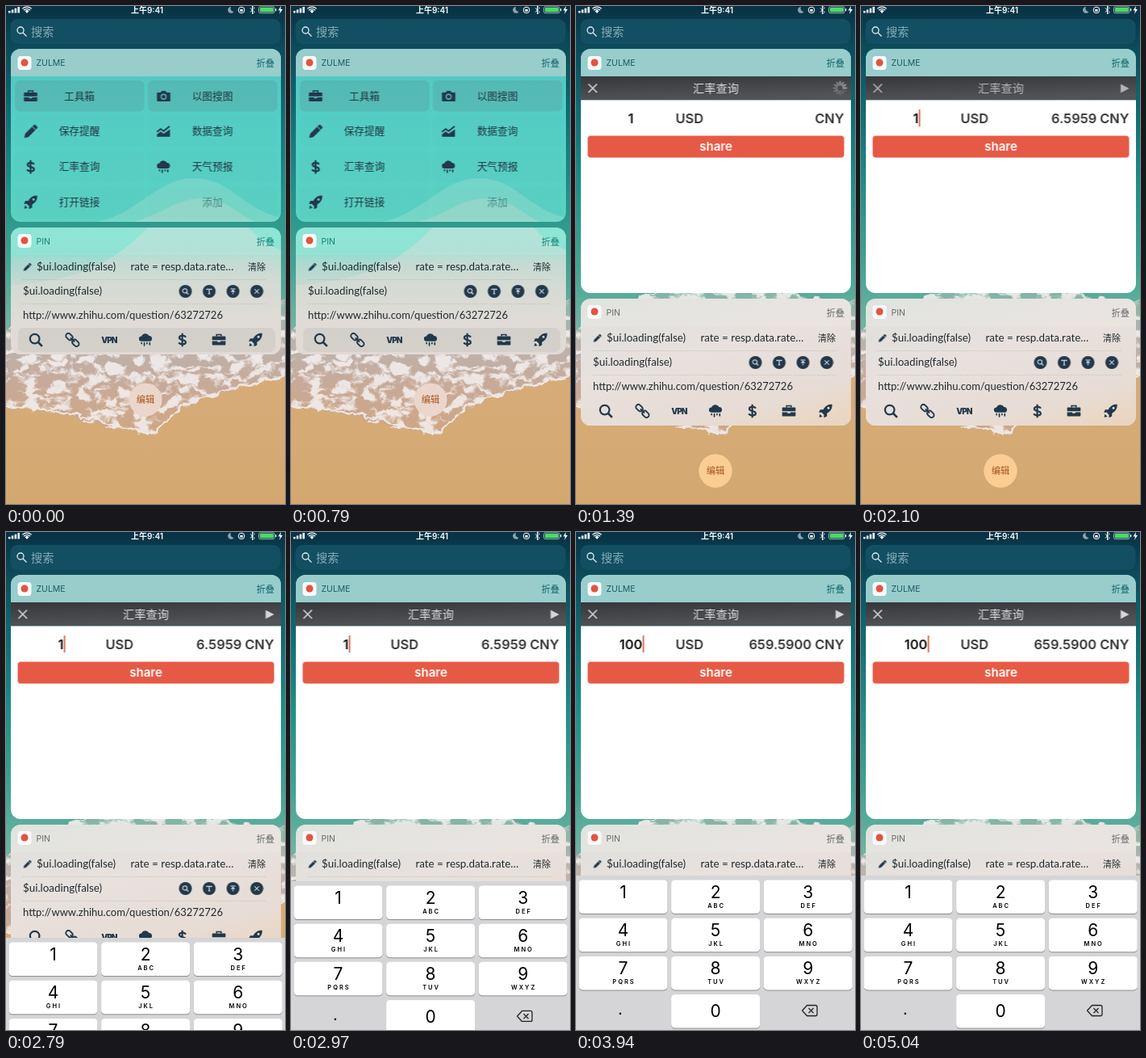
Write an HTML page that moves like this. It is 346 by 616 pixels and loops after 5.14 s.

```html
<!DOCTYPE html>
<html lang="zh-CN">
<head>
<meta charset="utf-8">
<title>Widgets</title>
<style>
html, body { margin: 0; width: 100%; height: 100%; overflow: hidden; background: #0a3d50; }
#stage { position: relative; width: 346px; height: 616px; overflow: hidden; }
#stage > *, .card > svg, .layer { position: absolute; }
svg { display: block; font-family: Inter, "Noto Sans CJK SC", "Noto Sans CJK", sans-serif; }
.cjk { font-family: "Noto Sans CJK SC", "Noto Sans CJK", "Noto Sans", sans-serif; }
.lato { font-family: Lato, "Noto Sans CJK SC", sans-serif; fill: #1f2a30; }
.mid { text-anchor: middle; }
.end { text-anchor: end; }
.ink { fill: #22384b; stroke: #22384b; stroke-width: 0; }
.card { left: 5.5px; width: 335px; border-radius: 12px; overflow: hidden; }
.layer { inset: 0; }
#board { top: 53px; height: 214px; background: linear-gradient(#52c6c0, #54d0c6 45%, #5ad2c2);
  animation: grow 5.14s infinite; }
#pin { top: 274px; height: 157px; background:
  linear-gradient(#82e2d2, #84e0d0 20%, #a6dacf 25%, #c6d8d1 45%, #d8dad5 70%, #ddd6d2); }
#pale { background: linear-gradient(165deg, #dde0dc, #e8e1de 42%, #e7dcd5 76%, #ead5bd); }
#pin, #edit { animation: slide 5.14s infinite; }
#pale, .warm { animation: appear 5.14s infinite; }
.pinTag { animation: grayTag 5.14s infinite; }
#view { animation: rise 5.14s infinite; }
#cells, #pill { animation: leave 5.14s infinite; }
#keys { left: 0; top: 425px; animation: keysUp 5.14s infinite; }
.bar { animation: dim 5.14s infinite; }
.step { animation: 5.14s step-end infinite; }
#wheel { transform-origin: 327px 101.5px; animation: spin 1.028s steps(12) infinite; }

@keyframes grow {
  0%, 15.56% { height: 214px; animation-timing-function: ease; }
  22.37%, 100% { height: 302px; }
}
@keyframes slide {
  0%, 15.56% { transform: none; animation-timing-function: ease; }
  22.37%, 100% { transform: translateY(88px); }
}
@keyframes rise {
  0%, 15.56% { transform: translateY(30px); opacity: 0; animation-timing-function: ease; }
  18.5% { opacity: 1; }
  22.37%, 100% { transform: none; opacity: 1; }
}
@keyframes leave { 0%, 15.56% { opacity: 1; } 18.5%, 100% { opacity: 0; } }
@keyframes appear { 0%, 15.56% { opacity: 0; } 20.4%, 100% { opacity: 1; } }
@keyframes grayTag { 0%, 15.56% { fill: #168577; } 20.4%, 100% { fill: #666d6d; } }
@keyframes dim { 0%, 37.3% { opacity: 1; } 39.1%, 49.42% { opacity: .76; } 50.97%, 100% { opacity: 1; } }
@keyframes keysUp {
  0%, 52.82% { transform: translateY(191px); animation-timing-function: cubic-bezier(.2,.7,.2,1); }
  60.99%, 100% { transform: none; }
}
@keyframes spin { to { transform: rotate(360deg); } }
@keyframes wait { 0% { opacity: 1; } 34.05%, 100% { opacity: 0; } }
@keyframes ready { 0% { opacity: 0; } 34.05%, 100% { opacity: 1; } }
@keyframes rate1 { 0% { opacity: 0; } 34.05% { opacity: 1; } 66.15%, 100% { opacity: 0; } }
@keyframes one { 0% { opacity: 1; } 66.15%, 100% { opacity: 0; } }
@keyframes ten { 0% { opacity: 0; } 66.15% { opacity: 1; } 69.65%, 100% { opacity: 0; } }
@keyframes hundred { 0% { opacity: 0; } 69.65%, 100% { opacity: 1; } }
@keyframes caret {
  0% { opacity: 0; transform: none; }
  39.1% { opacity: 1; }
  49.42% { opacity: 0; }
  50.97% { opacity: 1; transform: none; }
  66.15% { opacity: 1; transform: translateX(5.5px); }
  69.65% { opacity: 1; transform: translateX(11px); }
  93.77% { opacity: 0; transform: translateX(11px); }
  98.05%, 100% { opacity: 1; transform: translateX(11px); }
}
</style>
</head>
<body>
<svg width="0" height="0" style="position:absolute">
  <defs>
    <symbol id="tools" viewBox="0 0 20 20"><path d="M7 5V3h6v2" fill="none" stroke-width="1.8"/><path d="M2 5h16q1 0 1 1v4.4H1V6q0-1 1-1zM1 11.6h7v1.5h4v-1.5h7V16q0 1-1 1H2q-1 0-1-1z"/></symbol>
    <symbol id="pencil" viewBox="0 0 20 20"><path d="M2 18l1-5 9-9 4 4-9 9zM13 3l1.5-1.5q1-.8 2 0l2 2q.8 1 0 2L17 7z" stroke-width=".8"/></symbol>
    <symbol id="dollar" viewBox="0 0 20 20"><path d="M14.6 6.5C13 3.5 6 3.5 6 7c0 4 8.6 2 8.6 6.2 0 3.3-7.6 3.5-9.2.3M10 1v18" fill="none" stroke-width="2.4"/></symbol>
    <symbol id="camera" viewBox="0 0 20 20"><path fill-rule="evenodd" d="M2 5h4l1.5-2h5L14 5h4q1 0 1 1v10q0 1-1 1H2q-1 0-1-1V6q0-1 1-1zM10 6.8a4 4 0 1 0 0 8 4 4 0 0 0 0-8z"/><circle cx="10" cy="10.8" r="2.5"/></symbol>
    <symbol id="chart" viewBox="0 0 20 20"><path d="M1 10.5l5-4 4 3 8-6.5" fill="none" stroke-width="2"/><path d="M1 17v-3l5-4 4 3 8.5-6v10z"/></symbol>
    <symbol id="rain" viewBox="0 0 20 20"><path d="M4.5 12a3.5 3.5 0 0 1 0-7 5.500 5.500 0 0 1 10-.5 3.800 3.800 0 0 1 1 7.500z"/><path d="M4.500 14v1M8.200 14v3.500M11.800 14v1M15.500 14v2.500" stroke-width="1.800" stroke-linecap="round"/></symbol>
    <symbol id="rocket" viewBox="0 0 20 20"><path fill-rule="evenodd" d="M19 1c-6 0-9 2-12 7H3l-2 4h4l3 3v4l4-2v-4c5-3 7-6 7-12zM14 4.300a1.700 1.700 0 1 0 0 3.400 1.700 1.700 0 0 0 0-3.400z"/><path d="M1.500 18.500l1-4.500L6 17.500z"/></symbol>
    <symbol id="search" viewBox="0 0 20 20"><circle cx="8.500" cy="8.500" r="6.300" fill="none" stroke-width="2.400"/><path d="M13 13l5.500 5.500" stroke-width="2.800"/></symbol>
    <symbol id="link" viewBox="0 0 20 20"><g transform="rotate(45 10 10)" fill="none" stroke-width="2"><rect x="-1" y="6.700" width="10" height="6.600" rx="3.300"/><rect x="11" y="6.700" width="10" height="6.600" rx="3.300"/><path d="M6 10h8"/></g></symbol>
    <symbol id="type" viewBox="0 0 20 20"><path d="M3 6V3.500h14V6M10 3.500V17M7 17h6" fill="none" stroke-width="2.600"/></symbol>
    <symbol id="top" viewBox="0 0 20 20"><path d="M3 3h14M10 18V7M5 11.500L10 6.500l5 5" fill="none" stroke-width="2.400"/></symbol>
    <symbol id="cross" viewBox="0 0 20 20"><path d="M3.500 3.500l13 13M16.500 3.500l-13 13" stroke-width="2.400"/></symbol>
  </defs>
</svg>

<div id="stage">
  <svg id="beach" width="346" height="616" viewBox="0 0 346 616">
    <defs>
      <linearGradient id="sea" x2="0" y2="1">
        <stop offset="0" stop-color="#083144"/><stop offset=".1" stop-color="#0b4858"/>
        <stop offset=".28" stop-color="#106a73"/><stop offset=".5" stop-color="#1f9089"/>
        <stop offset=".72" stop-color="#42a592"/><stop offset=".92" stop-color="#7db7a6"/>
      </linearGradient>
      <linearGradient id="sand" x2="0" y2="1"><stop offset="0" stop-color="#d7ac7a"/><stop offset="1" stop-color="#d3a870"/></linearGradient>
      <linearGradient id="wash" x2="0" y2="1">
        <stop offset="0" stop-color="#78b5a5"/><stop offset=".4" stop-color="#bdb3ad"/>
        <stop offset=".65" stop-color="#c6aa9a"/><stop offset="1" stop-color="#d0a684"/>
      </linearGradient>
      <filter id="ragged" x="-.1" y="-.1" width="1.2" height="1.2">
        <feTurbulence type="fractalNoise" baseFrequency=".06" numOctaves="3" seed="7"/>
        <feDisplacementMap in="SourceGraphic" scale="14" xChannelSelector="R" yChannelSelector="G"/>
      </filter>
      <filter id="froth" x="0" y="0" width="1" height="1">
        <feTurbulence type="fractalNoise" baseFrequency=".05 .09" numOctaves="5" seed="4"/>
        <feColorMatrix values="0 0 0 0 .91  0 0 0 0 .88  0 0 0 0 .88  7 0 0 0 -3.200"/>
        <feComposite in2="SourceGraphic" operator="in"/>
      </filter>
      <path id="foam" d="M-10 402C30 398 50 360 120 352S210 344 250 353 320 368 356 362V453C325 464 310 464 290 473S250 481 234 491 208 499 200 512 178 530 158 528 130 522 112 518 90 507 66 506 30 496 -10 495Z"/>
    </defs>
    <rect width="346" height="450" fill="url(#sea)"/>
    <rect y="440" width="346" height="176" fill="url(#sand)"/>
    <g filter="url(#ragged)">
      <use href="#foam" fill="url(#wash)"/>
      <use href="#foam" filter="url(#froth)" opacity=".85"/>
      <path d="M-10 494C30 492 60 505 88 506S130 520 158 527 190 522 200 511 220 493 240 486 320 465 356 452" fill="none" stroke="#eee7e4" stroke-width="2.500"/>
    </g>
  </svg>

  <svg width="346" height="52" viewBox="0 0 346 52">
    <rect x="5.5" y="16" width="335" height="31" rx="9" fill="#134f62"/>
    <g fill="none" stroke="#e4eef0" stroke-width="1.3"><circle cx="18" cy="30" r="4"/><path d="M21 33l4.5 4.5"/></g>
    <text class="cjk" x="31" y="37" font-size="14.200" fill="#86aeb9">搜索</text>
    <g fill="#fff">
      <path d="M3 6h2.500v2.500H3zM6.800 4.500h2.500v4H6.800zM10.600 2.800h2.500v5.700h-2.500zM14.400 1h2.500v7.500h-2.500z"/>
      <path d="M23.500 6.300L26 9l2.500-2.700a3.600 3.600 0 0 0-5 0z"/>
      <path d="M20.300 3.400a8.200 8.200 0 0 1 11.400 0M22 5.300a5.700 5.700 0 0 1 8 0" fill="none" stroke="#fff" stroke-width="1.300"/>
      <text class="mid" x="175" y="8.600" font-size="10" font-weight="600">上午9:41</text>
      <path d="M279 1a4 4 0 1 0 3.500 6A4 4 0 0 1 279 1z" fill="#8ba3ad"/>
      <g fill="none" stroke="#fff"><circle cx="292" cy="5" r="3.800"/><path d="M303 2.500l5 5-2.500 2.500V0L308 2.500l-5 5"/></g>
      <rect x="290.300" y="4" width="3.400" height="2.800"/>
      <rect x="313.500" y=".8" width="19.500" height="8" rx="2" fill="none" stroke="#b8cdd0" stroke-width=".8"/>
      <rect x="314.800" y="2" width="17" height="5.600" rx="1" fill="#4cd964"/>
      <path d="M334 3.300h1.200v3H334zM341 0l-3.500 5.500h2.500L339 10l4-6h-2.500z"/>
    </g>
  </svg>

  <div id="board" class="card">
    <svg width="335" height="302" viewBox="5.5 53 335 302">
      <g id="cells">
        <path d="M105 268C160 262 185 213 232 213S290 250 341 262V268z" fill="#d5e6dc" opacity=".22"/>
        <path d="M150 268C190 262 205 239 240 238S290 262 312 268z" fill="#ecdcd2" opacity=".25"/>
      </g>
      <g id="view">
        <linearGradient id="steel" x2=".3" y2="1"><stop offset="0" stop-color="#36373a"/><stop offset="1" stop-color="#525458"/></linearGradient>
        <rect x="5" y="87" width="336" height="29.5" fill="url(#steel)"/>
        <rect x="5" y="116.5" width="336" height="260" fill="#fff"/>
        <g class="bar">
          <path d="M15 96.5l10.5 10.5M25.5 96.5l-10.5 10.5" stroke="#d2d2d2" stroke-width="1.7"/>
          <text class="cjk mid" x="173" y="106.7" font-size="14.2" font-weight="500" fill="#dedede">汇率查询</text>
          <path class="step" style="animation-name:ready" d="M321.5 96.5l10.5 5.5-10.5 5.5z" fill="#d6d6d6"/>
        </g>
        <g class="step" style="animation-name:wait"><g id="wheel"></g></g>
        <g font-size="16.4" font-weight="600" fill="#333" id="amounts">
          <text x="123" y="144.5">USD</text>
        </g>
        <rect class="step" style="animation-name:caret" x="71.3" y="128" width="1.7" height="21" fill="#d85f40"/>
        <rect x="14" y="160.500" width="318" height="27" rx="4" fill="#e65a45"/>
        <text class="mid" x="173" y="179.300" font-size="15" font-weight="600" fill="#fff">share</text>
      </g>
      <rect x="5" y="53" width="336" height="34" fill="#98cdcc"/>
      <rect x="14" y="62" width="17" height="17" rx="4" fill="#f8fafa"/>
      <circle cx="22.500" cy="70" r="4.500" fill="#e4533f"/>
      <text x="37" y="74.300" font-size="10.500" fill="#1d5a63">ZULME</text>
      <text class="cjk end" x="332.500" y="74.800" font-size="11.300" fill="#11666b">折叠</text>
    </svg>
  </div>

  <div id="pin" class="card">
    <svg width="335" height="157" viewBox="5.5 274 335 157">
      <path d="M5 345C100 340 140 310 175 274H300C315 290 330 298 341 302V431H5z" fill="#eaded7" opacity=".38"/>
    </svg>
    <div id="pale" class="layer"></div>
    <svg width="335" height="157" viewBox="5.5 274 335 157">
      <rect x="5" y="274" width="336" height="34" fill="#fff" opacity=".1"/>
      <rect x="14" y="282" width="17" height="17" rx="4" fill="#f8fafa"/>
      <circle cx="22.500" cy="290" r="4.500" fill="#e4533f"/>
      <text class="pinTag" x="37" y="295" font-size="10.500">PIN</text>
      <text class="cjk end pinTag" x="332.500" y="295.500" font-size="11.300">折叠</text>
      <g class="lato" font-size="13.400">
        <text x="37.500" y="327">$ui.loading(false)</text>
        <text x="154" y="327">rate = resp.data.rate…</text>
        <text x="20.500" y="357">$ui.loading(false)</text>
        <text x="20.500" y="387" font-size="13">http://www.zhihu.com/question/63272726</text>
      </g>
      <text class="cjk" x="299.500" y="326.600" font-size="11" fill="#1f2a30">清除</text>
      <path d="M20 338.500h303M20 368.500h303" stroke="#77827f" stroke-opacity=".4" stroke-width=".7" stroke-dasharray="1.500 1.500"/>
      <rect id="pill" x="14" y="398" width="319" height="30" rx="7" fill="#8d9996" fill-opacity=".16"/>
      <g id="actions" class="ink"></g>
    </svg>
  </div>

  <svg id="edit" width="346" height="616" viewBox="0 0 346 616">
    <circle cx="173" cy="487" r="20.500" fill="#ead6cb"/>
    <circle class="warm" cx="173" cy="487" r="20.500" fill="#fbcd93"/>
    <text class="cjk mid" x="173" y="491.200" font-size="11.300" fill="#a4521f">编辑</text>
  </svg>

  <svg id="keys" width="346" height="191" viewBox="0 425 346 191">
    <rect y="425" width="346" height="191" fill="#d5d5d7"/>
  </svg>
</div>

<script>
const add = (id, html) => document.getElementById(id).insertAdjacentHTML('beforeend', html);
const icon = (name, x, y, size, extra = '') =>
  `<use href="#${name}" x="${x - size / 2}" y="${y - size / 2}" width="${size}" height="${size}" ${extra}/>`;

const tools = [['tools', '工具箱'], ['camera', '以图搜图'], ['pencil', '保存提醒'], ['chart', '数据查询'],
  ['dollar', '汇率查询'], ['rain', '天气预报'], ['rocket', '打开链接'], ['', '添加']];
tools.forEach(([name, label], i) => {
  const x = i % 2 * 165, y = 111 + (i >> 1) * 43.8;
  add('cells', `<rect x="${10.5 + x}" y="${y - 19}" width="160.5" height="38.5" rx="6"
      fill="#60757c" opacity="${i < 2 ? .2 : .02}"/>
    ${name ? `<g class="ink">${icon(name, 30 + x, y + .5, 18.5)}</g>` : ''}
    <text class="cjk mid" x="${90.5 + x}" y="${y + 4.6}" font-size="12.7" font-weight="${name ? 500 : 400}"
      fill="${name ? '#20353f' : '#468b88'}">${label}</text>`);
});

for (let i = 0; i < 12; i++)
  add('wheel', `<path d="M327 97.5v-4" stroke="#ccc" stroke-width="1.5" stroke-linecap="round"
    opacity="${.2 + i * .06}" transform="rotate(${i * 30} 327 101.5)"/>`);

const stepText = (anim, cls, x, label) =>
  `<text class="step ${cls}" style="animation-name:${anim}" x="${x}" y="144.5">${label}</text>`;
[['one', '1'], ['ten', '10'], ['hundred', '100']].forEach(([a, n]) =>
  add('amounts', `<g fill="#111">${stepText(a, 'mid', 67.5, n)}</g>`));
[['wait', ''], ['rate1', '6.5959 '], ['ten', '65.9590 '], ['hundred', '659.5900 ']].forEach(([a, n]) =>
  add('amounts', stepText(a, 'end', 332, n + 'CNY')));

add('actions', icon('pencil', 26, 323, 11));
['search', 'type', 'top', 'cross'].forEach((name, i) => {
  const x = 222 + i * 29.5;
  add('actions', `<circle cx="${x}" cy="353" r="8"/>` + icon(name, x, 353, 8.5, 'fill="#e8eeee" stroke="#e8eeee"'));
});
['search', 'link', '', 'rain', 'dollar', 'tools', 'rocket'].forEach((name, i) => {
  const x = 36.5 + i * 45.4;
  add('actions', name ? icon(name, x, 413, 18.5)
    : `<text class="mid" x="${x}" y="416.7" font-size="10" font-weight="900" letter-spacing="-1">VPN</text>`);
});

const letters = ['', 'ABC', 'DEF', 'GHI', 'JKL', 'MNO', 'PQRS', 'TUV', 'WXYZ'];
const key = (col, row, digit, sub = '') => {
  const x = 3.5 + col * 114.6, y = 430.5 + row * 47.2, c = x + 55;
  add('keys', `<rect x="${x}" y="${y + 1}" width="110" height="41.5" rx="4.5" fill="#8b8c90"/>
    <rect x="${x}" y="${y}" width="110" height="41.5" rx="4.5" fill="#fff"/>
    <text class="mid" x="${c}" y="${y + (row < 3 ? 22.5 : 27.5)}" font-size="21">${digit}</text>
    <text class="mid" x="${c + 1}" y="${y + 34.5}" font-size="7.5" font-weight="600" letter-spacing="2">${sub}</text>`);
};
letters.forEach((sub, i) => key(i % 3, i / 3 | 0, i + 1, sub));
key(1, 3, 0);
add('keys', `<text class="mid" x="55" y="597" font-size="20">.</text>
  <path d="M280.5 592l6-6.5h10.5q2 0 2 2v9q0 2-2 2h-10.5zM288.5 589l6 6M294.5 589l-6 6"
    fill="none" stroke="#222" stroke-width="1.3" stroke-linejoin="round"/>`);
</script>
</body>
</html>
```
